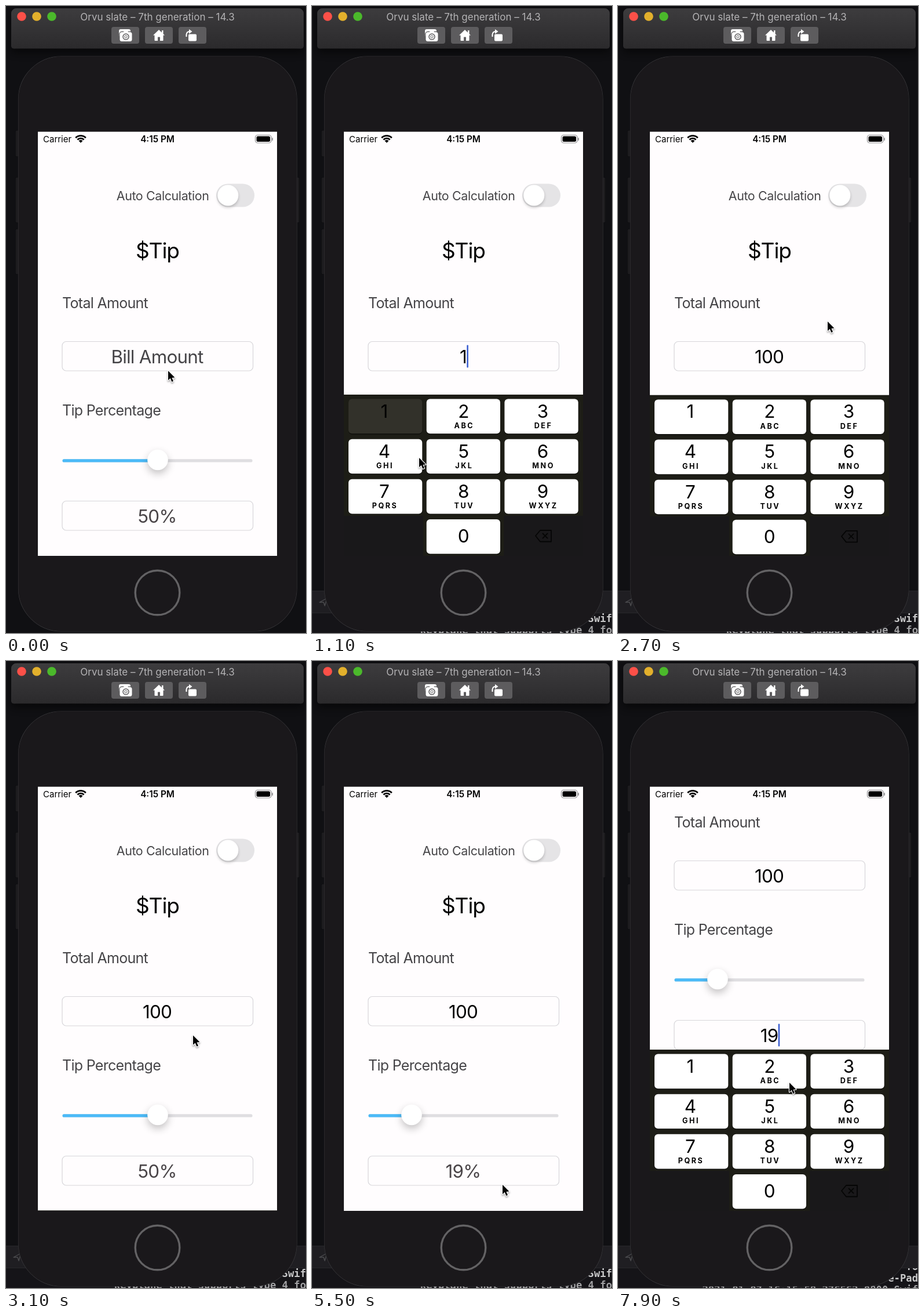
These frames come from a looping animation (518 px wide and 1081 px high, 8 s). An HTML page with a canvas:

```html
<!DOCTYPE html>
<html lang="en">
<head>
<meta charset="utf-8">
<title>Tip calculator</title>
<style>
html, body { margin: 0; width: 100%; height: 100%; overflow: hidden; background: #101013; }
canvas { display: block; width: 518px; height: 1081px; }
</style>
</head>
<body>
<canvas id="stage"></canvas>
<script>
const W = 518, H = 1081, LOOP = 8000, STEP = 100;
const SANS = 'Inter, "Open Sans", sans-serif';
const MONO = '"DejaVu Sans Mono", "Liberation Mono", monospace';
const SCREEN = { x: 55, y: 216.5, w: 413, h: 731.5 };
const MID = 261.5, KEYS_H = 278, SCROLL = 234;
const INK = '#454447', CARET = '#3d60d2';
const FOCUS_BILL = 300, BLUR_BILL = 2600, FOCUS_TIP = 6600;

const canvas = document.getElementById('stage');
const ctx = canvas.getContext('2d');
const dpr = window.devicePixelRatio || 1;
canvas.width = W * dpr;
canvas.height = H * dpr;

const clamp = v => Math.max(0, Math.min(1, v));
const smooth = v => { v = clamp(v); return v * v * (3 - 2 * v); };
const easeOut = k => 1 - (1 - k) ** 2.1;
const within = (t, a, b) => t >= a && t < b;

// Critically damped spring from 0 to 1
function spring(ms) {
  const p = Math.max(0, ms) / 50;
  return 1 - (1 + p) * Math.exp(-p);
}

// Where the pointer rests, and when
const stops = [
  { from: 0, to: 200, x: 279, y: 628 },
  { from: 300, to: 400, x: 278, y: 614 },
  { from: 900, to: 1000, x: 145, y: 700 },
  { from: 1300, to: 1800, x: 262, y: 934 },
  { from: 2500, to: 2800, x: 361, y: 543 },
  { from: 3500, to: 3900, x: 270, y: 780 },
  { from: 4500, to: 4700, x: 180, y: 780, ease: easeOut },
  { from: 5500, to: 5500, x: 328, y: 902 },
  { from: 5700, to: 5900, x: 334, y: 917 },
  { from: 6500, to: 6700, x: 334, y: 901 },
  { from: 7900, to: 8000, x: 295, y: 726 }
];
const keyTaps = [{ at: 900, key: '1' }, { at: 1300, key: '0' }, { at: 1600, key: '0' }];
const clicks = [FOCUS_BILL, ...keyTaps.map(k => k.at), 2500, 5700, 6500];
const drag = { from: 3900, to: 4500 };

function pointer(t) {
  const i = stops.findIndex(s => t <= s.to);
  const b = stops[i], a = stops[i - 1];
  if (t >= b.from) return b;
  const k = (t - a.to) / (b.from - a.to), e = b.ease ? b.ease(k) : k;
  return { x: a.x + (b.x - a.x) * e, y: a.y + (b.y - a.y) * e };
}

function box(x, y, w, h, r, fill, stroke, line = 1) {
  ctx.beginPath();
  ctx.roundRect(x, y, w, h, r);
  paint(fill, stroke, line);
}

function circle(x, y, r, fill, stroke, line) {
  ctx.beginPath();
  ctx.arc(x, y, r, 0, 7);
  paint(fill, stroke, line);
}

function poly(points, fill, stroke, line) {
  ctx.beginPath();
  points.forEach(([x, y]) => ctx.lineTo(x, y));
  ctx.closePath();
  ctx.lineJoin = 'round';
  paint(fill, stroke, line);
}

function paint(fill, stroke, line = 1) {
  if (stroke) { ctx.strokeStyle = stroke; ctx.lineWidth = line; ctx.stroke(); }
  if (fill) { ctx.fillStyle = fill; ctx.fill(); }
}

function text(s, x, y, size, opt = {}) {
  const { color = '#000', align = 'left', weight = 400, track = 0, font = SANS } = opt;
  ctx.font = `${weight} ${size}px ${font}`;
  ctx.letterSpacing = track * size + 'px';
  ctx.textAlign = align;
  ctx.fillStyle = color;
  ctx.fillText(s, x, y);
  return ctx.measureText(s).width;
}

function shadowed(color, blur, dy, draw) {
  ctx.save();
  ctx.shadowColor = color;
  ctx.shadowBlur = blur * dpr;
  ctx.shadowOffsetY = dy * dpr;
  draw();
  ctx.restore();
}

function clipped(x, y, w, h, draw) {
  ctx.save();
  ctx.beginPath();
  ctx.rect(x, y, w, h);
  ctx.clip();
  draw();
  ctx.restore();
}

function drawConsole(t) {
  if (t < 400) return;
  box(0, 1008, W, 73, 0, '#151418');
  box(-1, 1008.5, W + 2, 38, 0, '#1f1e22', '#303033');
  poly([[13, 1028], [26, 1021], [22, 1034], [20, 1028]], null, '#4c4c4f', 1.4);
  const later = t >= 6800;
  const lines = later
    ? ['fo', 'e-Pad', '2021-01-07 16:15:58.276562-0800 Swif']
    : ['Swif', 'keyplane that supports type 4 fo'];
  const first = later ? 1050 : 1062;
  clipped(0, 1047, W, 34, () => lines.forEach((s, i) => text(s, W, first + 20 * i, 17.2,
    { font: MONO, weight: 700, align: 'right', color: s.length > 9 ? '#a2a2a4' : '#c9c9ca' })));
}

function drawToolbar() {
  const g = ctx.createLinearGradient(0, 4, 0, 73);
  g.addColorStop(0, '#3d3c3e');
  g.addColorStop(1, '#2b2a2c');
  shadowed('rgba(0,0,0,.6)', 14, 6, () => box(9.5, 4.5, 504, 68.5, [8, 8, 4, 4], g, '#48474a'));
  ['#fc5048', '#e2b02c', '#4bb92b'].forEach((c, i) => circle(27 + 26 * i, 18, 7.8, c));
  text('Orvu slate – 7th generation – 14.3', MID, 24.5, 17, { align: 'center', color: '#b4b3b5' });
  const icons = [drawCamera, drawHouse, drawRotate];
  icons.forEach((icon, i) => {
    ctx.save();
    ctx.translate(206 + 58 * i, 50.5);
    box(-24, -14.5, 48, 29, 4, '#5d5c5e');
    icon();
    ctx.restore();
  });
}

function drawCamera() {
  box(-11, -10.5, 20, 13, 3, '#fff');
  box(-9.5, -5.5, 21, 16, 3.5, '#fff', '#5d5c5e', 2.5);
  box(-3, -7.5, 8, 4, 2, '#fff');
  circle(1, 2.5, 5, null, '#5d5c5e', 1.5);
  circle(1, 2.5, 2.2, null, '#5d5c5e', 1);
}

function drawHouse() {
  poly([[-10, 0], [0, -9.5], [10, 0]], '#fff');
  box(5, -8.5, 2.5, 6, 0, '#fff');
  box(-7.5, -1, 15, 10.5, 1, '#fff');
  box(-2, 3, 4, 6.5, 0, '#5d5c5e');
}

function drawRotate() {
  box(-7, -2, 14, 12, 2, '#fff');
  ctx.beginPath();
  ctx.moveTo(-10.5, 2.5);
  ctx.quadraticCurveTo(-11.5, -6.5, -5, -6.5);
  paint(null, '#fff', 2);
  poly([[-6, -10.5], [-.5, -6.5], [-6, -2.5]], '#fff');
}

function drawPhone() {
  const button = (x, y, h) => box(x, y + .5, 7, h, 2, '#1d1c1f', '#070709');
  button(16.5, 214, 45);
  button(16.5, 384, 78);
  [16.5, 499.5].forEach(x => button(x, 295, 78));
  box(21.5, 87, 480.5, 991, 74, '#1a181b', '#38373a', 1.2);
  circle(MID, 1011.5, 38.3, null, '#636264', 3.4);
}

function drawStatus() {
  text('Carrier', 64, 235, 15);
  text('4:15 PM', MID, 235, 15.3, { weight: 600, align: 'center' });
  for (const r of [12.4, 7.9, 2.6]) {
    ctx.beginPath();
    ctx.arc(129, 236, r, -Math.PI * .75, -Math.PI * .25);
    paint(null, '#000', r < 3 ? 4.6 : 2.8);
  }
  box(430.5, 222.5, 27.5, 13.5, 4, null, '#8e8d90', 1.2);
  box(432.5, 224.5, 23.5, 9.5, 2.5, '#000');
  box(459.3, 227, 1.7, 5, 1, '#8e8d90');
}

function field(y, s, color, caret) {
  box(97, y + .5, 329.5, 50.5, 7, null, '#d7d6da', 1.2);
  const w = text(s, 261, y + 37.7, 31.4, { align: 'center', color, track: -.024 });
  if (caret) box(261.3 + (s === 'Bill Amount' ? 0 : w / 2), y + 6.5, 2.6, 39, 1, CARET);
}

function drawForm(t) {
  const label = { color: INK, track: -.028 };
  text('Auto Calculation', 350.5, 334.8, 21.4, { color: INK, track: -.017, align: 'right' });
  box(363, 306.5, 66, 40, 20, '#e5e4e6');
  shadowed('rgba(0,0,0,.2)', 5, 3, () => circle(383.3, 326.5, 18, '#fff'));
  text('$Tip', MID, 435, 37, { align: 'center', track: -.028 });
  text('Total Amount', 97, 520.8, 25, label);
  text('Tip Percentage', 97, 705.8, 25, label);

  const typed = keyTaps.filter(k => t > k.at).map(k => k.key).join('');
  field(578, typed || 'Bill Amount', typed ? '#000' : INK, within(t, FOCUS_BILL, BLUR_BILL));

  const pulled = easeOut(clamp((t - drag.from) / (drag.to - drag.from)));
  const thumb = 262 - 90 * pulled;
  box(97.5, 781.3, 328, 5.2, 2.6, '#dfdee1');
  box(97.5, 781.3, thumb - 97.5, 5.2, 2.6, '#4bbaf7');
  shadowed('rgba(0,0,0,.24)', 14, 6, () => circle(thumb, 782.5, 17.8, '#fff'));

  const percent = Math.round(50 + (thumb - 262) / 2.9);
  const editing = t >= FOCUS_TIP;
  field(853, percent + (editing ? '' : '%'), editing ? '#000' : '#4a4548', editing);
}

function drawKeys(t) {
  box(55, 0, 413, KEYS_H + 2, 0, '#1d1d16');
  [55, 331].forEach(x => box(x, 209, 137, 71, 0, '#19181a'));
  const letters = ' ,,ABC,DEF,GHI,JKL,MNO,PQRS,TUV,WXYZ'.split(',');
  const held = keyTaps.find(k => within(t, k.at, k.at + 250));
  for (let n = 0; n < 10; n++) {
    const col = n ? (n - 1) % 3 : 1, row = n ? Math.floor((n - 1) / 3) : 3;
    const x = 63 + col * 134.7, y = 7.6 + row * 69.1, mid = 125 + col * 136.8;
    const down = held && held.key === String(n);
    box(x, y + 1, 127.3, 59.8, 6, '#0b0b08');
    box(x, y, 127.3, 59.6, 6, down ? '#32312a' : '#fff');
    text(String(n), mid, y + (n ? 31.9 : 40.3), 31.5, { align: 'center' });
    text(letters[n], mid + 1, y + 50.2, 12.6, { align: 'center', weight: 700, track: .2 });
  }

  // Delete key
  poly([[386, 243.5], [394, 234], [413, 234], [413, 253.5], [394, 253.5]], null, '#050505', 1.8);
  for (const d of [-4.5, 4.5]) {
    ctx.beginPath();
    ctx.moveTo(402.5 - d, 239);
    ctx.lineTo(402.5 + d, 248);
    ctx.stroke();
  }
}

function drawScreen(t) {
  const { x, y, w, h } = SCREEN;
  const shown = spring(t - FOCUS_BILL) - spring(t - 2696) + spring(t - 6800);
  clipped(x, y, w, h, () => {
    box(x, y, w, h, 0, '#fffdfe');
    ctx.save();
    ctx.translate(0, -SCROLL * smooth((t - 7030) / 420));
    drawForm(t);
    ctx.restore();
    drawStatus();
    if (shown > .002) {
      ctx.translate(0, y + h - KEYS_H * shown);
      drawKeys(t);
    }
  });
}

function drawPointer(t) {
  const { x, y } = pointer(t);
  const pressed = within(t, drag.from, drag.to) || clicks.some(c => within(t, c, c + 100));
  if (pressed) circle(x, y + 2, 27.7, null, '#111013', 2);
  ctx.save();
  ctx.translate(x + 1, y + 1);
  ctx.scale(.88, .88);
  const arrow = [[0, 0], [0, 18.5], [4.2, 14.6], [7.2, 21.6], [10.2, 20.3], [7.3, 13.5], [13, 13.1]];
  shadowed('rgba(0,0,0,.35)', 3, 2, () => poly(arrow, null, '#fff', 2.6));
  poly(arrow, '#000');
  ctx.restore();
}

function render(now) {
  const t = Math.floor((now % LOOP) / STEP) * STEP;
  ctx.setTransform(dpr, 0, 0, dpr, 0, 0);
  box(0, 0, W, H, 0, '#101013');
  drawConsole(t);
  drawToolbar();
  drawPhone();
  drawScreen(t);
  drawPointer(t);
}

const start = performance.now();
function tick() {
  render(performance.now() - start);
  requestAnimationFrame(tick);
}
tick();
</script>
</body>
</html>
```
